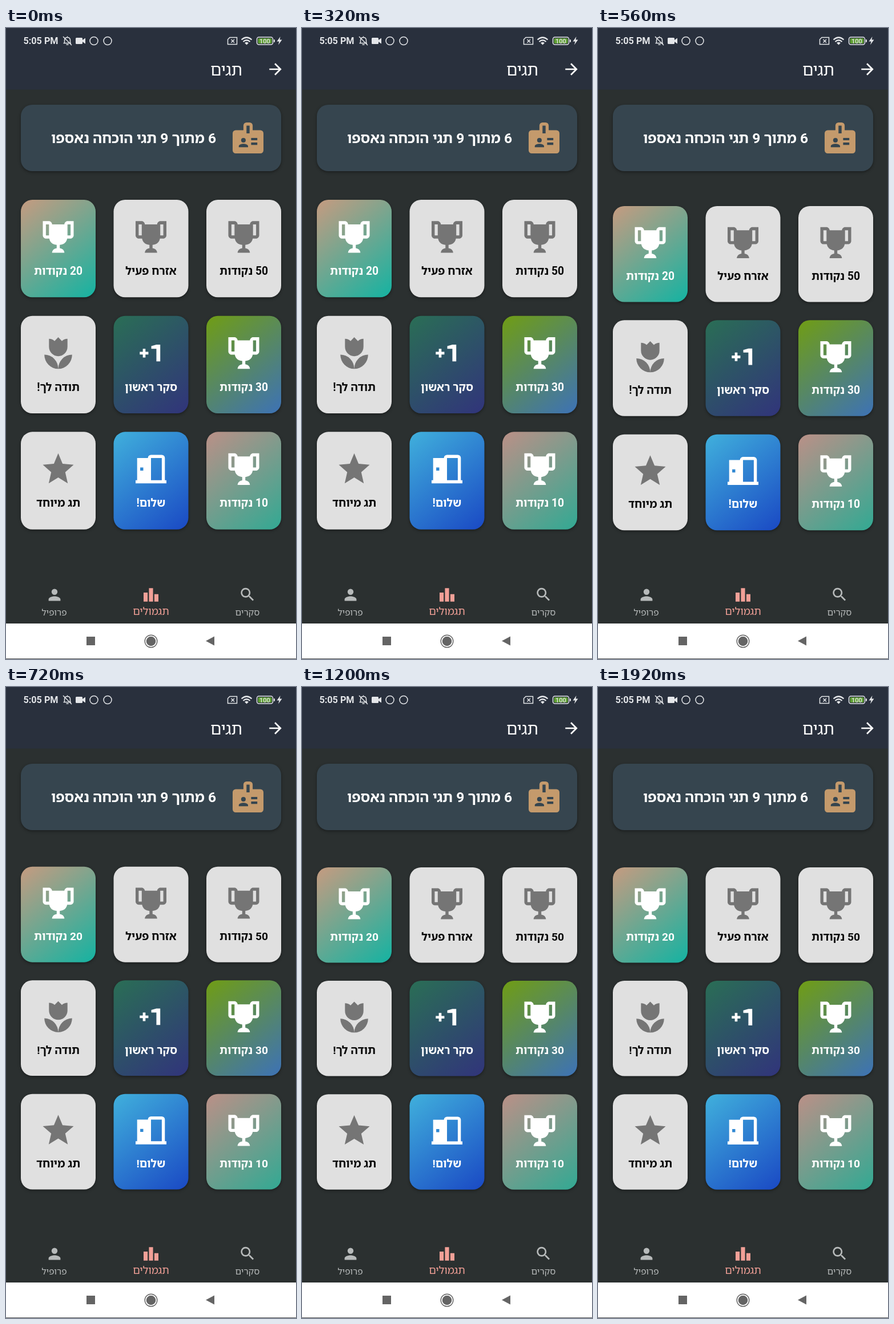
These frames come from a looping animation (508 by 1102 pixels, 2 s). An HTML page:

```html
<!DOCTYPE html>
<html lang="he">
<head>
<meta charset="utf-8">
<style>
html, body { margin: 0; width: 100%; height: 100%; overflow: hidden; background: #2b3030; }
svg { display: block; width: 100%; height: 100%; }
text { font-family: Roboto, "Noto Sans Hebrew", "Open Sans", "Noto Sans", sans-serif; text-anchor: middle; direction: rtl; }
.ltr { direction: ltr; }
.shadow { filter: drop-shadow(0 2.5px 2.5px rgba(0, 0, 0, .38)); }
</style>
</head>
<body>
<svg id="stage" viewBox="0 0 508 1102">
  <defs id="defs"></defs>
  <rect width="508" height="1102" fill="#2b3030"/>
  <rect width="508" height="107.5" fill="#29303d"/>
  <g id="status" fill="#e4e6e9" stroke="none">
    <text class="ltr" x="61" y="28" font-size="16.2" font-weight="600">5:05 PM</text>
    <g fill="none" stroke="#e4e6e9" stroke-width="1.5">
      <path d="M100.5 26.5H114M102.500 26V21.500C102.500 17.500 104.500 16.500 107.500 16.500S112.500 18 112.500 21.500V26M107.500 14.500V16.500M105.500 29H109.500M100 15L115 30"/>
      <circle cx="154" cy="22.500" r="7"/>
      <circle cx="178" cy="22.500" r="7"/>
      <path d="M392 16.500H404.500V28.500H388.500V20ZM394.500 20L400 25.500M400 20L394.500 25.500"/>
      <path d="M412.500 20.500Q421.500 12.500 430.500 20.500M415.500 24Q421.500 18.500 427.500 24" stroke-width="2.200"/>
      <rect x="439.500" y="16" width="28" height="13" rx="3.500"/>
    </g>
    <path d="M122 18.500Q122 17 123.500 17H132.500Q134 17 134 18.500V21L139 17.500V27.500L134 24V26.500Q134 28 132.500 28H123.500Q122 28 122 26.500Z"/>
    <path d="M418 26Q421.500 23 425 26L421.500 29.500Z"/>
    <rect x="441.500" y="18" width="24" height="9" rx="1.500" fill="#5f9f33"/>
    <text class="ltr" x="453.500" y="26.500" font-size="11" font-weight="500">100</text>
    <rect x="469" y="20" width="2" height="5" rx="1"/>
    <path d="M480.500 15L474.500 23.500H478.500L477 29.500L483.500 20.500H479.500Z"/>
  </g>
  <text x="386" y="82.500" font-size="28.400" fill="#fff">תגים</text>
  <rect class="shadow" x="26" y="134" width="456" height="116" rx="20" fill="#36454f"/>
  <text x="223.500" y="200.500" font-size="24.600" font-weight="600" fill="#fff">6 מתוך 9 תגי הוכחה נאספו</text>
  <g id="grid"></g>
  <g id="icons"></g>
  <text x="84.500" y="1025.500" font-size="15.600" fill="#b7baba">פרופיל</text>
  <text x="254" y="1024.500" font-size="18.300" fill="#f2a097">תגמולים</text>
  <text x="423" y="1025.500" font-size="15.600" fill="#b7baba">סקרים</text>
  <rect y="1040" width="508" height="61" fill="#fff"/>
  <rect y="1101" width="508" height="1" fill="#55585a"/>
  <g fill="#646464">
    <rect x="141" y="1063" width="15" height="15"/>
    <circle cx="254" cy="1071" r="8.300"/>
    <circle cx="254" cy="1071" r="10.800" fill="none" stroke="#646464" stroke-width="1.400"/>
    <path d="M350 1070.500L365 1062.500V1078.500Z"/>
  </g>
</svg>
<script>
const NS = 'http://www.w3.org/2000/svg';
const $ = id => document.getElementById(id);

function add(parent, tag, attrs, text) {
  const el = document.createElementNS(NS, tag);
  for (const k in attrs) el.setAttribute(k, attrs[k]);
  if (text) el.textContent = text;
  return parent.appendChild(el);
}

// Shapes on a 24-unit square
const shapes = {
  cup: 'M18 2C17.1 2 16 3 16 4H8C8 3 6.9 2 6 2H2V11C2 12 3 13 4 13H6.2C6.6 15 7.9 16.7 11 17V19.08C8 19.54 8 22 8 22H16C16 22 16 19.54 13 19.08V17C16.1 16.7 17.4 15 17.8 13H20C21 13 22 12 22 11V2ZM6 11H4V4H6ZM20 11H18V4H20Z',
  tulip: 'M3 13A9 9 0 0 0 12 22A9 9 0 0 0 3 13ZM12 22A9 9 0 0 0 21 13A9 9 0 0 0 12 22ZM18 3V8A6 6 0 0 1 6 8V3Q8.2 3 9.61 4.39L12 2L14.39 4.39Q15.8 3 18 3Z',
  star: 'M12 17.27L18.18 21L16.54 13.97L22 9.24L14.81 8.62L12 2L9.19 8.62L2 9.24L7.45 13.97L5.82 21Z',
  door: 'M12 3A2 2 0 0 0 10 5H3V19H2V21H22V19H21V5A2 2 0 0 0 19 3ZM12 5H19V19H12ZM5 11H7V13H5Z',
  plusOne: 'M6.700 9.300H8.400V11.200H10.300V12.900H8.400V14.800H6.700V12.900H4.700V11.200H6.700ZM12.200 7.600L15.500 6.700H18V17.300H15.500V9.300H12.200Z',
  badge: 'M20 7H15V4A2 2 0 0 0 13 2H11A2 2 0 0 0 9 4V7H4A2 2 0 0 0 2 9V20A2 2 0 0 0 4 22H20A2 2 0 0 0 22 20V9A2 2 0 0 0 20 7ZM9 12A1.5 1.5 0 0 1 9 15A1.5 1.5 0 0 1 9 12ZM12 18H6V17.25C6 16.25 8 15.75 9 15.75S12 16.25 12 17.25ZM13 9H11V4H13ZM18 16.5H14V15H18ZM18 13.5H14V12H18Z',
  arrow: 'M12 4L10.59 5.41L16.17 11H4V13H16.17L10.59 18.59L12 20L20 12Z',
  person: 'M12 12A4 4 0 1 0 12 4A4 4 0 0 0 12 12ZM12 14C9.33 14 4 15.34 4 18V20H20V18C20 15.34 14.67 14 12 14Z',
  bars: 'M2 9H7.5V21H2ZM9.25 3H14.75V21H9.25ZM16.5 11H22V21H16.5Z',
  search: 'M15.5 14H14.71L14.43 13.73A6.5 6.5 0 1 0 13.73 14.43L14 14.71V15.5L19 20.49L20.49 19ZM9.5 14A4.5 4.5 0 1 1 9.5 5A4.5 4.5 0 0 1 9.5 14Z'
};

function icon(parent, name, x, y, scale, fill) {
  add(parent, 'path', {
    d: shapes[name], fill, 'fill-rule': 'evenodd',
    transform: `translate(${x} ${y}) scale(${scale}) translate(-12 -12)`
  });
}

icon($('icons'), 'arrow', 472, 72, 1.34, '#fff');
icon($('icons'), 'badge', 424, 192, 2.7, '#c49a6c');
icon($('icons'), 'person', 85, 990, 1.3, '#b7baba');
icon($('icons'), 'bars', 254, 990, 1.3, '#f2a097');
icon($('icons'), 'search', 423, 989.5, 1.3, '#b7baba');

const W = 131, H = 166.5;
const cards = [
  ['cup', '20 נקודות', '#c69b80', '#14b3a2'],
  ['cup', 'אזרח פעיל'],
  ['cup', '50 נקודות'],
  ['tulip', 'תודה לך!'],
  ['plusOne', 'סקר ראשון', '#2a6e55', '#31347b'],
  ['cup', '30 נקודות', '#709d14', '#3d72b6'],
  ['star', 'תג מיוחד'],
  ['door', 'שלום!', '#40b0dc', '#1a49c4'],
  ['cup', '10 נקודות', '#bb9087', '#32a993']
];

cards.forEach(([name, label, from, to], i) => {
  const x = 26 + 162.5 * (i % 3), y = 315 + 198.1 * Math.floor(i / 3);
  const g = add($('grid'), 'g', { transform: `translate(${x} ${y})` });
  if (from) {
    const grad = add($('defs'), 'linearGradient', {
      id: 'g' + i, gradientUnits: 'userSpaceOnUse', x1: 0, y1: 0, x2: W, y2: H
    });
    add(grad, 'stop', { offset: 0, 'stop-color': from });
    add(grad, 'stop', { offset: 1, 'stop-color': to });
  }
  add(g, 'rect', { class: 'shadow', width: W, height: H, rx: 20, fill: from ? `url(#g${i})` : '#e0e0e0' });
  icon(g, name, W / 2, 63.5, 2.7, from ? '#fff' : '#757575');
  add(g, 'text', { x: W / 2, y: 128, 'font-size': 19.2, 'font-weight': 600, fill: from ? '#fff' : '#080808' }, label);
});

// Overscroll stretch: held, then released as a critically damped spring
const LOOP = 2000, STEP = 80, RELEASE = 298, RATE = 0.01, BOTTOM = 964;

function pull(t) {
  if (t < RELEASE) return 1 + 0.02 * Math.min(t / 160, 1);
  const u = (t - RELEASE) * RATE;
  return t < 960 ? 1.02 * (1 + u) * Math.exp(-u) : 0;
}

function draw(now) {
  const t = Math.floor((now % LOOP) / STEP) * STEP;
  const s = 1 + 0.0231 * pull(t);
  $('grid').setAttribute('transform', `translate(0 ${BOTTOM}) scale(1 ${s}) translate(0 ${-BOTTOM})`);
}

const start = performance.now();
function tick() {
  draw(performance.now() - start);
  requestAnimationFrame(tick);
}
tick();
</script>
</body>
</html>
```
